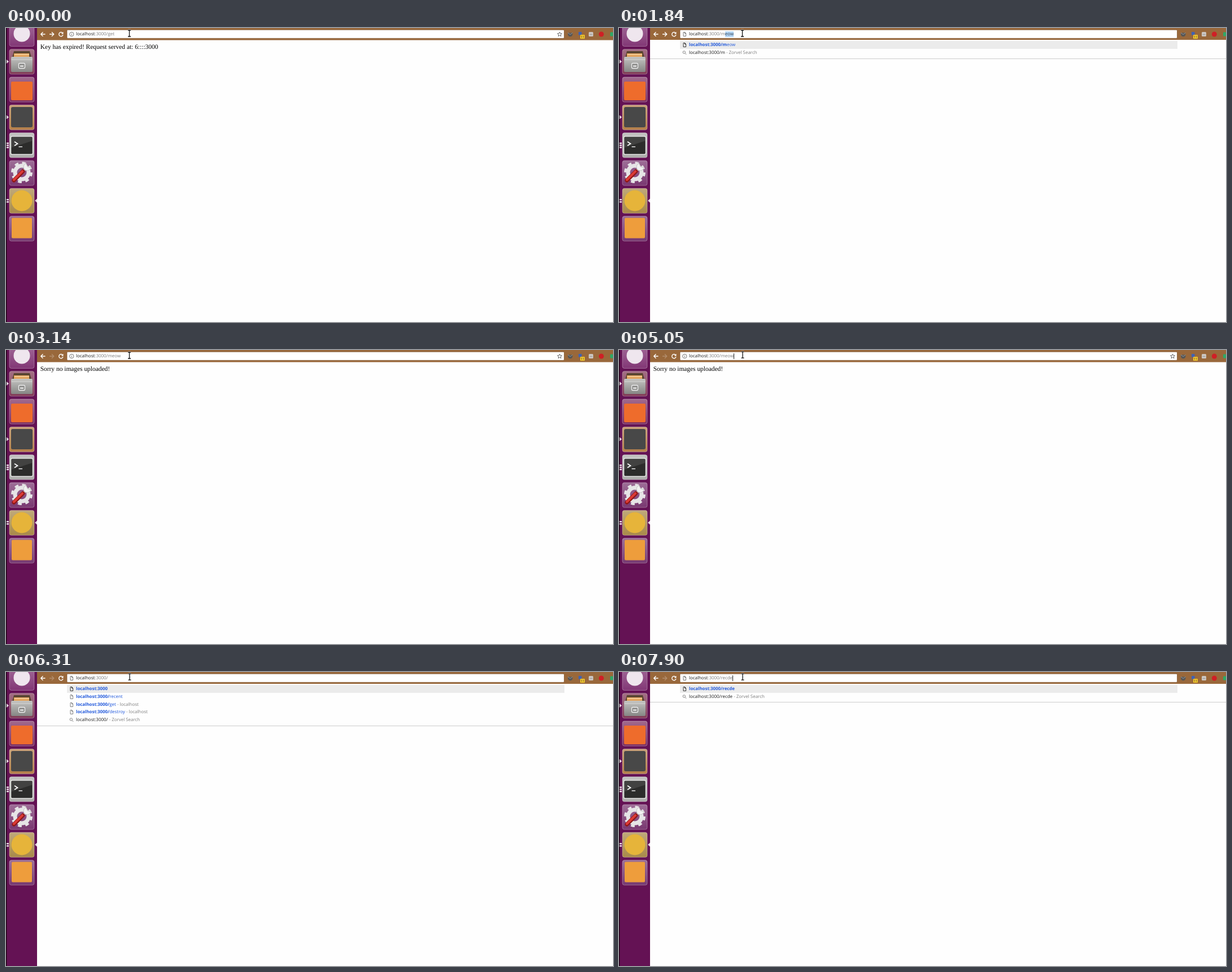
Write an HTML page that moves like this. It is 1075 px wide and 521 px high and loops after 8000 ms.

```html
<!DOCTYPE html>
<html lang="en">
<head>
<meta charset="utf-8">
<title>Browser typing</title>
<style>
html, body { margin: 0; width: 100%; height: 100%; overflow: hidden; background: #fefefe; }
body { position: relative; text-rendering: geometricPrecision; }
svg, div { position: absolute; left: 0; top: 0; }
div { white-space: pre; }
#page { left: 60.7px; top: 28.4px; font: 11.43px/13px "Liberation Serif", serif; color: #000; }
#url, #list { font: 7.95px/14px "Open Sans", "Noto Sans", sans-serif; color: #7c7c7c; }
#url { left: 124px; top: 3.7px; }
#url b { font-weight: 400; color: #1c1c1c; }
#url u { text-decoration: none; color: #345; background: #b4d6f6; line-height: 10px; display: inline-block; }
#url i { position: absolute; top: 2.3px; width: 1px; height: 10px; background: #222; }
#list { left: 55px; top: 21px; width: 1020px; background: #fefefe; border-bottom: 1px solid #cdcdcd; }
.row { left: 53px; width: 881px; height: 14px; padding-left: 16px; box-sizing: border-box; }
.row:first-child { background: #ebebeb; }
.row b { font-size: 7.86px; }
.row b, .row em { color: #2058dc; font-style: normal; }
.row s { color: #1c1c1c; text-decoration: none; }
.row svg { left: 2px; top: 1px; }
</style>
</head>
<body>
<svg id="shell" width="1075" height="521" viewBox="0 0 1075 521">
  <defs>
    <linearGradient id="gloss" x2="0" y2="1"><stop stop-color="#fff" stop-opacity=".3"/><stop offset="1" stop-color="#fff" stop-opacity=".04"/></linearGradient>
    <linearGradient id="steel" x2="0" y2="1"><stop stop-color="#c4c4c2"/><stop offset="1" stop-color="#868684"/></linearGradient>
  </defs>
  <rect width="55" height="521" fill="#641254"/>
  <rect width="1.3" height="521" fill="#17030f"/>
  <g id="tiles"></g>

  <circle cx="28" cy="10" r="14.5" fill="#efe6ee"/>

  <path d="M11 52 14 41H42L45 52Z" fill="#5a4632"/>
  <path d="M14 51V45H41V51Z" fill="#e3a35b"/>
  <path d="M15 47H41" stroke="#f6dcb4" stroke-width="1.2"/>
  <rect x="9" y="51" width="38" height="27" rx="2" fill="url(#steel)"/>
  <path d="M9.500 56H46.500" stroke="#d8d8d6"/>
  <rect x="22.500" y="62.500" width="11" height="9" rx="2" fill="#8d8d8b" stroke="#ededed" stroke-width="1.3"/>
  <path d="M25 67.500H31" stroke="#f5f5f5" stroke-width="2"/>

  <rect x="9" y="95" width="38" height="33" rx="2" fill="#ee6c2c"/>
  <rect x="9" y="140" width="38" height="36" rx="3" fill="#484848"/>

  <rect x="8.500" y="192" width="39" height="32" rx="2.500" fill="#2c2c2b" stroke="#e4e4e2" stroke-width="1.5"/>
  <path d="M9.500 193H46.500V200L9.500 212Z" fill="#fff" opacity=".1"/>
  <path d="M15 201.500 20.500 205 15 208.500" fill="none" stroke="#fff" stroke-width="1.7"/>
  <path d="M22.500 210.500H29" stroke="#fff" stroke-width="1.4"/>

  <circle cx="28" cy="256" r="12" fill="none" stroke="#e6e4e6" stroke-width="7"/>
  <circle cx="28" cy="256" r="16.500" fill="none" stroke="#e6e4e6" stroke-width="5" stroke-dasharray="6.500 6.460"/>
  <path d="M26 258 39 245" stroke="#ddd" stroke-width="4.500"/>
  <path d="M36 240 38 246 44 247A6.500 6.500 0 1 1 36 240Z" fill="#f1f1f1" stroke="#aaa" stroke-width=".6"/>
  <path d="M14 270 30 254" stroke="#8f1717" stroke-width="7" stroke-linecap="round"/>
  <path d="M14 269 29 254" stroke="#dc3b36" stroke-width="4" stroke-linecap="round"/>

  <circle cx="28" cy="306" r="18.500" fill="#e6b43a"/>
  <rect x="10" y="336.500" width="36" height="36" rx="2" fill="#ee9d3c"/>

  <g fill="#e5d8e2">
    <path d="M1 56 5 59.500 1 63ZM1 154.500 5 158 1 161.500ZM55 302.500 51 306 55 309.500Z"/>
    <path d="M1 203H5V205.500H1ZM1 206.700H5V209.200H1ZM1 210.400H5V212.900H1ZM1 303H5V305.500H1ZM1 307H5V309.500H1Z"/>
  </g>

  <rect x="55" width="1020" height="21.500" fill="#99683b"/>
  <rect x="108" y="3.300" width="880.500" height="15" rx="1.500" fill="#fff" stroke="#7f5530" stroke-width=".7"/>
  <g fill="none" stroke="#fff" stroke-width="1.4">
    <path d="M69.500 11H62M65.500 7.300 61.800 11 65.500 14.700"/>
    <path id="forward" d="M77 11H84.500M81 7.300 84.700 11 81 14.700"/>
    <path d="M100 8.700A3.600 3.600 0 1 0 100.900 11.800"/>
  </g>
  <path d="M101.500 6.800V10.500H97.800Z" fill="#fff"/>
  <path id="star" d="M980.500 7 981.600 9.700 984.500 9.900 982.300 11.800 983 14.600 980.500 13.100 978 14.600 978.700 11.800 976.500 9.900 979.400 9.700Z" fill="none" stroke="#555" stroke-width=".9"/>
  <path d="M995 8.500H1003.500V11A4.200 4.200 0 0 1 995 11Z" fill="#565656"/>
  <path d="M995 8.500 999.200 11.500 1003.500 8.500" fill="none" stroke="#aaa" stroke-width=".8"/>
  <rect x="1014" y="7" width="5.500" height="5.500" fill="#3f62b5"/>
  <rect x="1017" y="12" width="8" height="7" rx="1" fill="#f3c72d"/>
  <text x="1021" y="18" text-anchor="middle" font-family="Open Sans, sans-serif" font-size="6" fill="#333">11</text>
  <rect x="1032" y="7" width="8" height="8" rx="1.500" fill="#cbc5c0"/>
  <path d="M1033.500 11.500H1038.500" stroke="#999"/>
  <circle cx="1054.300" cy="11" r="4.500" fill="#cf1f25"/>
  <rect x="1070" y="7.500" width="6" height="7" rx="1" fill="#2fa866"/>
</svg>
<div id="page"></div>
<div id="list"></div>
<div id="url"></div>
<svg id="mark" width="12" height="12" style="left:110px;top:5px"></svg>
<svg id="mouse" width="10" height="16" viewBox="0 0 10 16">
  <path d="M2.500 2H7.500M5 2V13M2.500 13H7.500" fill="none" stroke="#fff" stroke-width="3" opacity=".7"/>
  <path d="M2.500 2H4.500L5 2.600 5.500 2H7.500M5 2.500V12.500M2.500 13H4.500L5 12.400 5.500 13H7.500" fill="none" stroke="#111" stroke-width="1.3"/>
</svg>
<script>
const $ = id => document.getElementById(id);
const LOOP = 8000, HOST = 'localhost', PORT = ':3000';
const EXPIRED = 'Key has expired! Request served at: 6::::3000';
const EMPTY = 'Sorry no images uploaded!';
const known = [['recent'], ['get', HOST], ['destroy', HOST], ['meow']];

// [start, typed path, options]; without a page text the suggestions are open
const states = [
  [0, 'get', { page: EXPIRED }],
  [560, 'get', { page: EXPIRED, caret: 1 }],
  [830, 'ge', { caret: 1 }],
  [980, 'g', { caret: 1 }],
  [1260, '', { caret: 1 }],
  [1690, '', {}],
  [1840, 'm', { auto: 'eow', gap: 1 }],
  [1970, 'me', { auto: 'ow' }],
  [2120, 'meo', { auto: 'w' }],
  [2270, 'meow', { caret: 1 }],
  [2710, 'meow', {}],
  [3140, 'meow', { page: EMPTY }],
  [4320, 'meow', { page: EMPTY, caret: 1 }],
  [4470, 'meow', { page: EMPTY, all: 1 }],
  [4600, 'meow', { page: EMPTY, all: 1 }],
  [5050, 'meow', { page: EMPTY, caret: 1 }],
  [5330, 'meo', { caret: 1 }],
  [5610, 'me', { caret: 1 }],
  [5730, 'm', { caret: 1 }],
  [5880, '', { caret: 1 }],
  [6310, '', {}],
  [6460, 're', { auto: 'cent', gap: 1 }],
  [6610, 'recd', { caret: 1 }],
  [6740, 'recde', { caret: 1 }],
  [7040, 'recden', { caret: 1 }],
  [7170, 'recdent', { caret: 1 }],
  [7620, 'recdent', {}],
  [7750, 'recden', { caret: 1 }],
  [7900, 'recde', { caret: 1 }]
];

const icons = {
  file: '<path d="M4 2.500H6.700L8.500 4.300V9.500H4ZM6.500 2.500V4.500H8.500"/>',
  find: '<circle cx="5.300" cy="5" r="2.200"/><path d="M7 6.700 9.300 9"/>',
  info: '<circle cx="6.300" cy="6" r="3.700"/><path d="M6.300 5.500V8M6.300 3.800V4.700"/>'
};
const icon = (kind, color) =>
  `<g fill="none" stroke="${color}" stroke-width=".9">${icons[kind]}</g>`;

function suggestions(typed, auto) {
  const base = `${HOST}${PORT}/`;
  const match = (path, title) =>
    `<b>${base}${typed}</b><em>${path.slice(typed.length)}</em>${title ? ' - ' + title : ''}`;
  const rows = [typed ? match(typed + auto) : `<b>${HOST}${PORT}</b>`];
  if (!auto) {
    const pages = typed ? known : known.slice(0, 3);
    for (const [path, title] of pages)
      if (path.startsWith(typed) && path !== typed) rows.push(match(path, title));
  }
  rows.push(`<s>${base}${typed}</s> - Zorvel Search`);
  return rows;
}

function drawList(typed, auto, gap) {
  const rows = suggestions(typed, auto), last = rows.length - 1;
  $('list').style.height = Math.round(25.9 + 13.75 * rows.length) + gap - 21 + 'px';
  $('list').innerHTML = rows.map((row, i) => {
    const mark = icon(i === last ? 'find' : 'file', i ? '#777' : '#222');
    return `<div class="row" style="top:${2.2 + 13.75 * i}px"><svg width="12" height="12">${mark}</svg>${row}</div>`;
  }).join('');
}

function draw([start, typed, { page, auto = '', gap = 0, caret, all }]) {
  const url = `<b>${HOST}</b>${PORT}/${typed}`;
  $('url').innerHTML = (all ? `<u>${url}</u>` : url) +
    (auto && `<u>${auto}</u>`) + (caret ? '<i></i>' : '');
  $('mark').innerHTML = icon(page ? 'info' : 'file', '#666');
  $('page').textContent = page || '';
  $('star').style.display = page ? '' : 'none';
  $('list').style.display = page ? 'none' : '';
  if (!page) drawList(typed, auto, gap);
  $('forward').style.opacity = start < 3140 ? 1 : .25;
  $('mouse').style.transform = start < 4600 ? 'translate(213.500px,2px)' : 'translate(214px,1.200px)';
}

const tileColors = ['#7d2f70', '#7c3350', '#78295c', '#b27a42', '#a9a9a7', '#74306b', '#a58542', '#70316c'];
$('tiles').innerHTML = tileColors.map((color, i) => {
  const box = `x="6" y="${-11.5 + 49.3 * i}" width="44" height="44" rx="3.500"`;
  return `<rect ${box} fill="${color}"/><rect ${box} fill="url(#gloss)" stroke="#fff" stroke-opacity=".3"/>`;
}).join('');

let shown;
function tick() {
  const t = performance.now() % LOOP;
  const state = states.findLast(s => s[0] <= t);
  if (state !== shown) draw(shown = state);
  requestAnimationFrame(tick);
}
tick();
</script>
</body>
</html>
```
